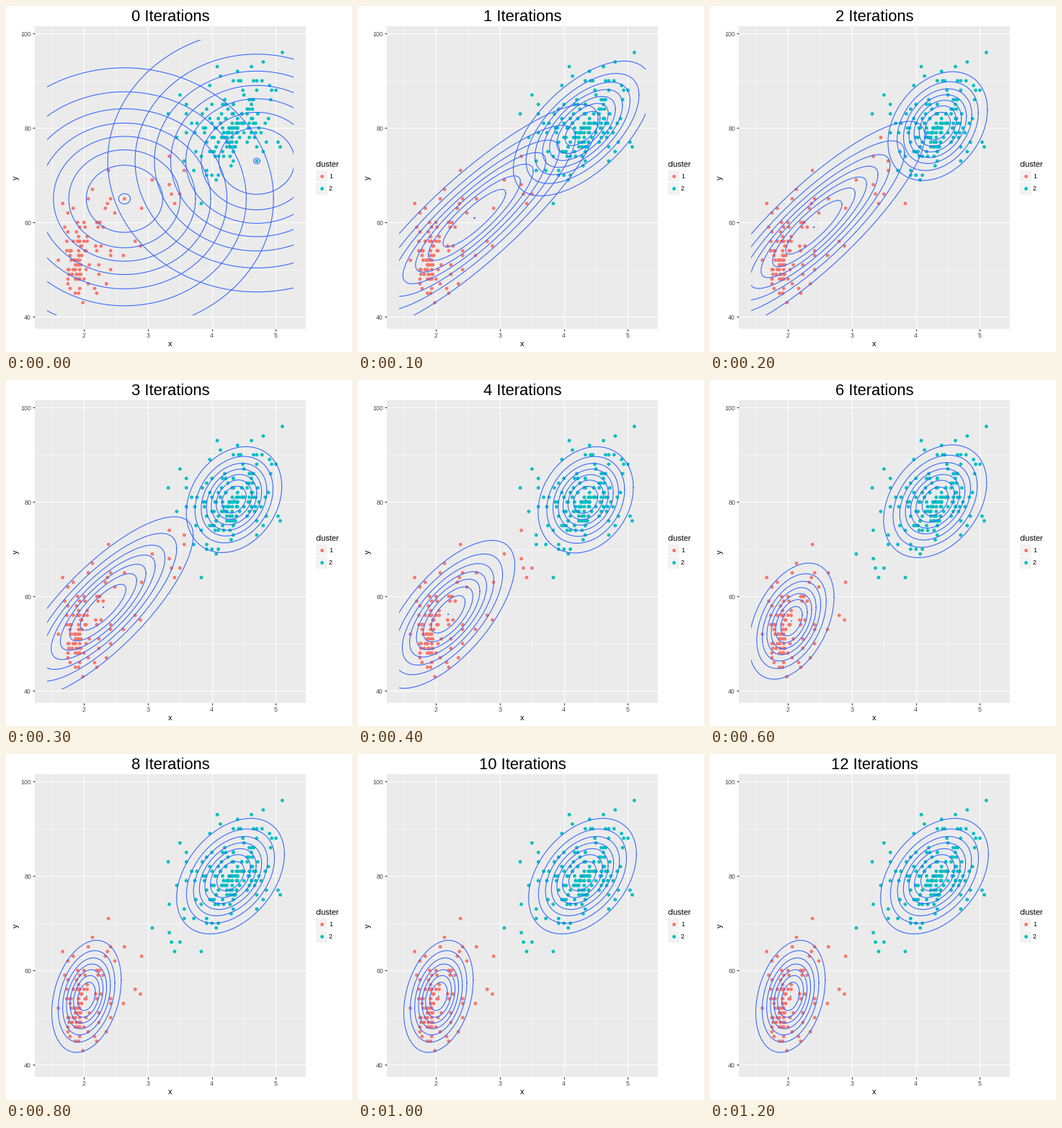
These frames come from a looping animation (480 px wide and 480 px high, 1300 ms). A matplotlib script:

```python
import numpy as np
import matplotlib.pyplot as plt
from matplotlib.animation import FuncAnimation
from matplotlib.patches import Rectangle

PX = 0.75  # points per pixel at 96 dpi
SIZE = 480
RED, TEAL, BLUE = "#F8766D", "#00BFC4", "#3366FF"
X_RANGE, Y_RANGE = (1.425, 5.275), (40.35, 98.65)
LEVELS = 8

plt.rcParams["font.family"] = "Liberation Sans"

# (mean x, mean y, sd x, sd y, correlation) of both clusters, per iteration
FITS = [
    [(2.633, 65.0, 1.1414, 13.594, 0.00), (4.700, 73.0, 1.1414, 13.594, 0.00)],
    [(2.600, 60.9, 0.948, 11.8, 0.87), (4.290, 79.9, 0.530, 7.00, 0.60)],
    [(2.404, 58.96, 0.851, 11.0, 0.86), (4.340, 80.4, 0.381, 5.65, 0.30)],
    [(2.300, 57.7, 0.690, 9.40, 0.79), (4.345, 80.5, 0.366, 5.50, 0.25)],
    [(2.190, 56.2, 0.511, 7.68, 0.66), (4.340, 80.45, 0.365, 5.52, 0.23)],
    [(2.110, 55.4, 0.400, 6.75, 0.53), (4.325, 80.3, 0.378, 5.68, 0.28)],
    [(2.055, 54.76, 0.326, 6.03, 0.41), (4.300, 80.15, 0.395, 5.86, 0.33)],
    [(2.042, 54.56, 0.281, 5.85, 0.32), (4.293, 80.02, 0.408, 5.95, 0.37)],
    [(2.040, 54.50, 0.266, 5.82, 0.29), (4.290, 79.97, 0.413, 6.00, 0.38)],
]

# Loose points around the two dense groups: y -> x values
EDGE = {
    96: [5.1], 94: [4.8], 93: [4.083, 4.617], 92: [4.4], 91: [4.133],
    90: [4.333, 4.417, 4.45, 4.65, 4.7, 4.783], 89: [3.967, 4.9],
    88: [4.483, 4.7, 4.933, 5.0], 87: [3.5, 4.5], 86: [4.2, 4.583, 4.917],
    85: [3.6, 4.0], 84: [3.917], 83: [3.317, 3.6], 82: [4.883],
    81: [3.683, 3.767], 79: [3.6, 3.733], 78: [3.45], 77: [5.033],
    76: [5.067], 75: [3.75, 4.8], 74: [3.333, 3.833],
    73: [3.567, 4.333, 4.7], 72: [4.3], 71: [2.383, 3.567, 3.717, 3.917],
    70: [3.917, 4.0, 4.1], 69: [3.067, 4.067], 68: [3.333], 67: [2.133],
    66: [3.367, 3.5], 65: [2.067, 2.417, 2.633],
    64: [1.667, 2.367, 3.417, 3.833], 63: [1.833, 2.333, 2.9],
    62: [1.75, 2.483], 60: [2.0, 2.2, 2.233, 2.25], 59: [1.7, 2.22, 2.3],
    58: [1.75], 56: [2.8], 55: [2.183, 2.267, 2.883],
    54: [1.733, 2.2, 2.417], 53: [2.417, 2.617], 52: [1.6], 51: [2.233],
    50: [2.417], 49: [2.233], 48: [1.75], 47: [1.75, 2.35],
    46: [1.783, 2.167], 45: [1.867, 1.917, 2.2], 43: [1.983],
}

rng = np.random.default_rng(7)


def core(n, fit, xlim, ylim):
    """Correlated normal points inside a box, x in whole sixtieths, y whole."""
    mx, my, sx, sy, rho = fit
    points = []
    while len(points) < n:
        u, v = rng.standard_normal(2)
        x = np.rint((mx + sx * u) * 60) / 60
        y = np.rint(my + sy * (rho * u + np.sqrt(1 - rho**2) * v))
        if xlim[0] <= x <= xlim[1] and ylim[0] <= y <= ylim[1]:
            points.append((x, y))
    return points


points = [(x, y) for y, xs in EDGE.items() for x in xs]
points += core(58, (1.92, 53, 0.11, 4.5, 0.1), (1.73, 2.12), (46, 60))
points += core(115, (4.33, 79.8, 0.26, 3.7, 0.3), (3.75, 4.85), (74, 86))
px, py = np.array(points).T


def distance2(fit, x, y):
    mx, my, sx, sy, rho = fit
    u, v = (x - mx) / sx, (y - my) / sy
    return (u * u - 2 * rho * u * v + v * v) / (1 - rho**2)


def log_density(fit, x, y):
    sx, sy, rho = fit[2:]
    return -distance2(fit, x, y) / 2 - np.log(sx * sy * np.sqrt(1 - rho**2))


def rings(fit):
    """Evenly spaced density contours, joined by gaps into one path."""
    mx, my, sx, sy, rho = fit
    cx, cy = np.meshgrid(X_RANGE, Y_RANGE)
    low = np.exp(-distance2(fit, cx, cy) / 2).min()
    level = np.arange(1, LEVELS + 1) / LEVELS * (1 - low)
    r = np.maximum(np.sqrt(-2 * np.log(level)), 0.01)[:, None]
    t = np.append(np.linspace(0, 2 * np.pi, 181), np.nan)
    x = mx + r * sx * np.cos(t)
    y = my + r * sy * (rho * np.cos(t) + np.sqrt(1 - rho**2) * np.sin(t))
    return x.ravel(), y.ravel()


fig = plt.figure(figsize=(5, 5), dpi=96, facecolor="white")

ax = fig.add_axes([40 / SIZE, 32 / SIZE, 376 / SIZE, 420 / SIZE],
                  facecolor="#EBEBEB")
ax.set(xlim=(1.2325, 5.4675), ylim=(37.435, 101.565),
       xticks=range(2, 6), yticks=range(40, 101, 20))
ax.set_xticks(np.arange(1.5, 5), minor=True)
ax.set_yticks(range(50, 91, 20), minor=True)
ax.set_axisbelow(True)
ax.spines[:].set_visible(False)
ax.grid(which="minor", color="white", lw=0.53 * PX)
ax.grid(which="major", color="white", lw=1.07 * PX)
ax.tick_params(which="minor", length=0)
ax.tick_params(which="major", length=2.75 * PX, width=1.07 * PX, pad=2.2 * PX,
               color="#333333", labelcolor="#4D4D4D", labelsize=8.8 * PX)

dots = ax.scatter(px, py, s=(4.8 * PX) ** 2, linewidths=0, zorder=3)
frame_box = Rectangle((X_RANGE[0], Y_RANGE[0]), np.ptp(X_RANGE),
                      np.ptp(Y_RANGE), transform=ax.transData)
contours = []
for _ in range(2):
    line, = ax.plot([], [], color=BLUE, lw=1.07 * PX, zorder=4)
    line.set_clip_path(frame_box)
    contours.append(line)

# Pixel-space layer for titles and legend
page = fig.add_axes([0, 0, 1, 1], facecolor="none")
page.set(xlim=(0, SIZE), ylim=(SIZE, 0))
page.axis("off")


def label(x, y, text, size, **kw):
    return page.text(x, y, text, fontsize=size * PX, **kw)


title = label(228, 21, "", 22, ha="center")
label(228, 472, "x", 11, ha="center")
label(13.5, 238, "y", 11, ha="center", va="center", rotation=90)
label(429, 223, "cluster", 11)
for k, color in enumerate((RED, TEAL)):
    top = 227 + 17.28 * k
    page.add_patch(Rectangle((429, top), 17.28, 17.28, fc="#F2F2F2",
                             ec="white", lw=1.07 * PX))
    page.scatter(437.6, top + 8.64, s=(4.8 * PX) ** 2, c=color,
                 linewidths=0, zorder=3)
    label(448, top + 11.8, str(k + 1), 8.8)


def update(i):
    fits = FITS[min(i, len(FITS) - 1)]
    first, second = (log_density(f, px, py) for f in fits)
    bias = 0.15 if i else 0  # the second cluster carries more weight once fitted
    dots.set_facecolor(np.where(first > second + bias, RED, TEAL))
    for line, fit in zip(contours, fits):
        line.set_data(*rings(fit))
    title.set_text(f"{i} Iterations")
    return [dots, title, *contours]


anim = FuncAnimation(fig, update, frames=13, interval=100, repeat=True,
                     repeat_delay=0, blit=False)
plt.show()
```
